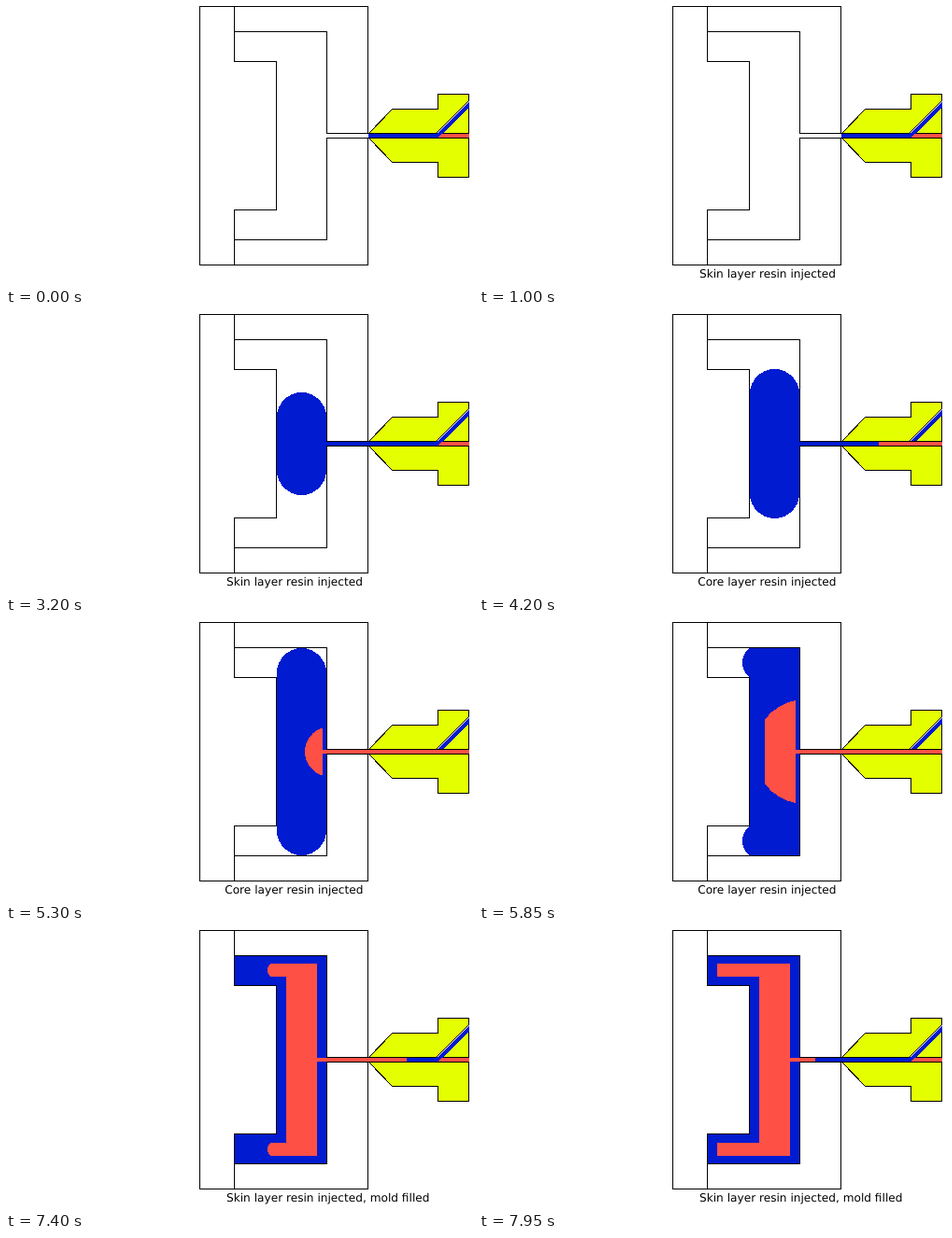
An HTML page for the animation above (8 s loop, 500x300 px).

```html
<!DOCTYPE html>
<html lang="en">
<head>
<meta charset="utf-8">
<title>Co-injection molding</title>
<style>
  html, body { margin: 0; width: 100%; height: 100%; overflow: hidden; background: #fff; }
  svg { display: block; shape-rendering: crispEdges; }
  .skin { fill: #001bd0; }
  .core { fill: #ff5046; }
  .line { fill: none; stroke: #000; }
  .body { fill: #e4ff00; stroke: #000; }
  text { font: 12.15px "DejaVu Sans", sans-serif; text-rendering: geometricPrecision; }
</style>
</head>
<body>
<svg width="500" height="300" viewBox="0 0 500 300">
  <clipPath id="wall"><path d="M306 0H343V300H306Z"/></clipPath>

  <path id="skin" class="skin"/>
  <path id="front" class="core" clip-path="url(#wall)"/>
  <path id="core" class="core"/>

  <!-- nozzle -->
  <path class="body" d="M388.5 136.5L413.5 110.5H462.5V94.5H495.5V101.5L460.5 136.5Z"/>
  <path class="body" d="M467.5 136.5L495.5 108.5V136.5Z"/>
  <path class="body" d="M388.5 141.5L413.5 167.5H462.5V183.5H495.5V141.5Z"/>
  <path class="skin" d="M461 137L496 102V108L467 137Z"/>

  <!-- runner -->
  <g id="runner"></g>
  <path id="valve" class="line" d="M460 136.5H468"/>

  <!-- mold -->
  <path class="line" d="M387.5 136.5V.5H207.5V277.5H387.5V141.5H343.5V250.5H244.5
    M244.5 277.5V218.5H289.5V59.5H244.5V.5M244.5 27.5H343.5V136.5H388"/>

  <text id="label" y="291"></text>
</svg>
<script>
const $ = id => document.getElementById(id);
const MID = 139, GATE = 343;

// Arc down a vertical chord at x, bulging left by s
function bulge(x, y1, y2, s) {
  const h = (y2 - y1) / 2, r = (s * s + h * h) / (2 * s);
  return `A${r} ${r} 0 ${s > h ? 1 : 0} 0 ${x} ${y2}`;
}
const cap = (x, h, s) => `M${x} ${MID - h}${bulge(x, MID - h, MID + h, s)}Z`;

function pill(h) {
  const r = 26.5, top = MID - h + r, end = MID + h - r;
  return `M290 ${top}A${r} ${r} 0 0 1 ${GATE} ${top}V${end}A${r} ${r} 0 0 1 290 ${end}Z`;
}

// C-shaped filling: lips end at x, each with a front bulging by s
function channel(x, s, left, right, top, lip) {
  const low = 2 * MID - lip, end = 2 * MID - top;
  const edge = (a, b) => s ? bulge(x, a, b, s) : `V${b}`;
  return `M${right} ${top}H${x}${edge(top, lip)}H${left}V${low}H${x}${edge(low, end)}H${right}Z`;
}
const cavity = (x, s) => channel(x, s, 290, GATE, 28, 59);
const inner = (x, s) => channel(x, s, 300, 333, 36, 50);

const SKIN = ["Skin layer resin injected", 236];
const CORE = ["Core layer resin injected", 234.2];
const DONE = ["Skin layer resin injected, mold filled", 236];

// Each step adds to the one before; blue and red are where the runner colors begin
const steps = [
  { at: 0, label: ["", 0], open: true, blue: 388, red: 461, skin: "", front: "", core: "" },
  { at: 1000, label: SKIN },
  { at: 1550, blue: 360 },
  { at: 2100, blue: GATE, skin: cap(GATE, 19, 18) },
  { at: 2650, skin: cap(GATE, 36, 42) },
  { at: 3200, skin: pill(55) },
  { at: 4200, label: CORE, open: false, red: 428, skin: pill(80) },
  { at: 4750, red: 379, skin: pill(95) },
  { at: 5300, red: 339, skin: pill(111), front: cap(339, 25.5, 19) },
  { at: 5850, skin: cavity(289, 7), front: cap(339, 55, 45) },
  { at: 6400, skin: cavity(273, 7), front: cap(339, 84, 71) },
  { at: 7400, label: DONE, open: true, blue: 429, red: 333,
    skin: cavity(245, 0), front: "", core: inner(284, 4) },
  { at: 7950, blue: 360, core: inner(255, 0) }
];
steps.forEach((s, i) => { steps[i] = { ...steps[i - 1], ...s }; });

function draw(s) {
  for (const id of ["skin", "front", "core"]) $(id).setAttribute("d", s[id]);
  const blue = `<path class="skin" d="M${s.blue} 137H467L462 141H${s.blue}Z"/>`;
  const red = `<path class="core" d="M${s.red} 137H496V141H${s.red}Z"/>`;
  $("runner").innerHTML = s.open
    ? red + blue + '<path class="skin" d="M461 136H468V137H461Z"/>'
    : blue + red;
  $("valve").style.display = s.open ? "none" : "";
  $("label").textContent = s.label[0];
  $("label").setAttribute("x", s.label[1]);
}

let shown;
function tick() {
  const t = performance.now() % 8000;
  const step = steps.findLast(s => s.at <= t);
  if (step !== shown) draw(shown = step);
  requestAnimationFrame(tick);
}
tick();
</script>
</body>
</html>
```
